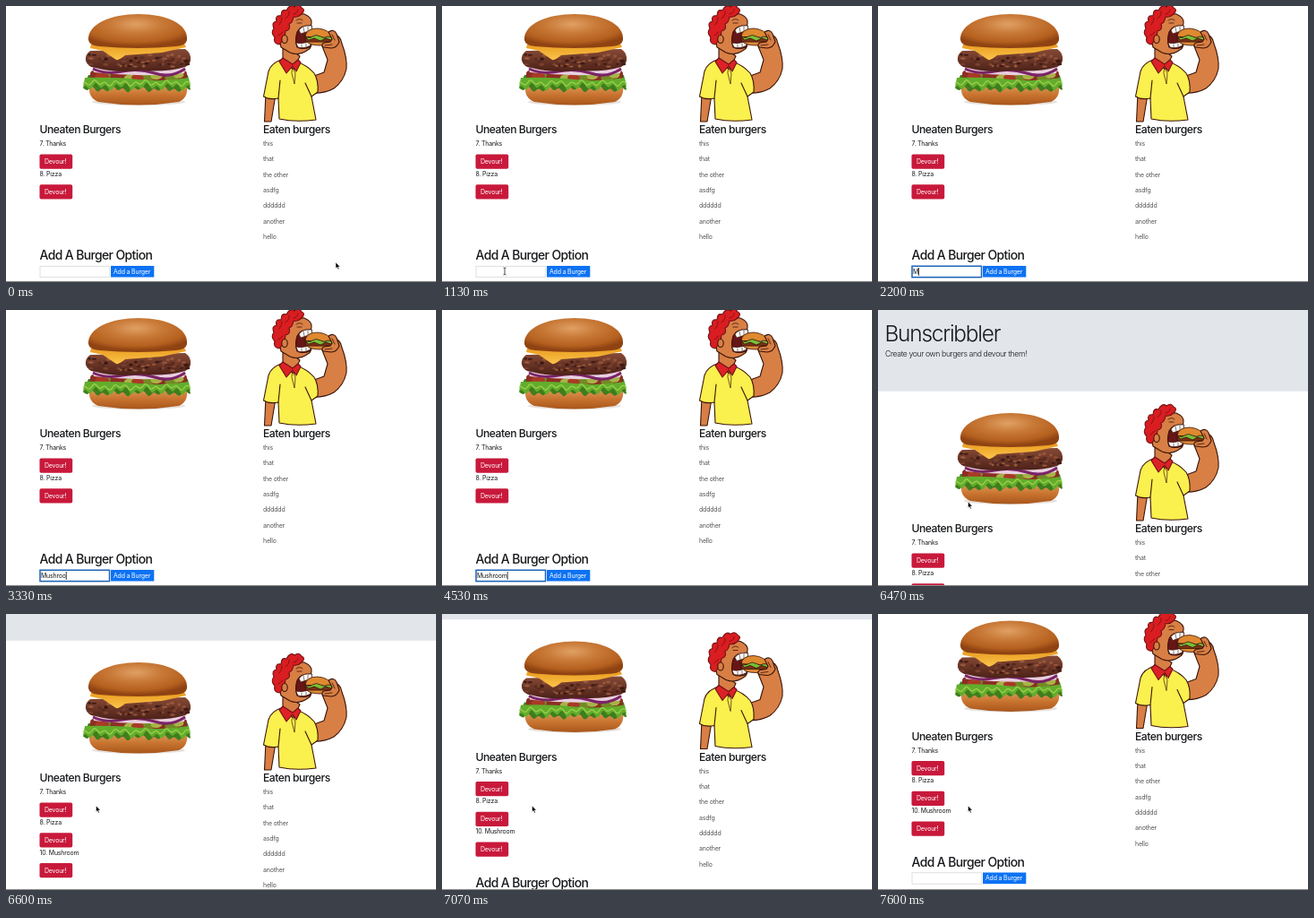
An HTML page for the animation above (8000 ms loop, 480 px wide and 308 px high).

```html
<!DOCTYPE html>
<html lang="en">
<head>
<meta charset="utf-8">
<title>Burger list</title>
<style>
  html, body { margin: 0; width: 100%; height: 100%; overflow: hidden; background: #fff; }
  svg { display: block; width: 480px; height: 308px; }
  text { font: 400 6.96px Inter, "Open Sans", sans-serif; letter-spacing: -.025em; fill: #16181b; white-space: pre; }
  .title { font-size: 24.4px; font-weight: 300; letter-spacing: -.05em; }
  .lead { font-size: 8.7px; font-weight: 300; letter-spacing: -.045em; }
  .h3 { font-size: 12.2px; font-weight: 500; letter-spacing: -.042em; }
  .h2 { font-size: 13.9px; font-weight: 500; letter-spacing: -.042em; }
  .eaten { fill: #555; }
  .label { fill: #fff; }
  .ink { stroke: #3a1408; stroke-width: 1.1; stroke-linejoin: round; stroke-linecap: round; }
  .skin { fill: #d87f45; }
  .line { fill: none; }
</style>
</head>
<body>
<svg viewBox="0 0 480 308">
  <defs>
    <radialGradient id="crown" cx=".48" cy=".3" r=".65">
      <stop offset="0" stop-color="#e0a064"/><stop offset=".4" stop-color="#c97a38"/>
      <stop offset=".8" stop-color="#b5601f"/><stop offset="1" stop-color="#8f4312"/>
    </radialGradient>
    <linearGradient id="heel" x2="0" y2="1">
      <stop offset="0" stop-color="#dc9a58"/><stop offset=".5" stop-color="#c8732f"/><stop offset="1" stop-color="#a8561c"/>
    </linearGradient>
    <linearGradient id="meat" x2="0" y2="1">
      <stop offset="0" stop-color="#874a35"/><stop offset="1" stop-color="#4c2118"/>
    </linearGradient>
    <linearGradient id="cheddar" x2="0" y2="1">
      <stop offset="0" stop-color="#e89a20"/><stop offset="1" stop-color="#fcc449"/>
    </linearGradient>
  </defs>

  <g id="page">
    <rect width="480" height="102.7" fill="#e2e6eb"/>
    <text class="title" x="7.5" y="46.5">Bunscribbler</text>
    <text class="lead" x="8" y="64.4">Create your own burgers and devour them!</text>

    <g transform="translate(0 118)">
      <g id="burger">
        <ellipse cx="148" cy="107" rx="52" ry="4" fill="#e6e1dd"/>
        <path fill="url(#heel)" d="M93 88H202Q204 102 193 107Q148 114 103 107Q91 102 93 88Z"/>
        <path id="leafBack" fill="#3f7d1d"/>
        <rect x="94" y="72" width="108" height="11" rx="4" fill="#8c2f22"/>
        <g id="pickles"></g>
        <path id="leaf" fill="#63ad2c"/>
        <path id="leafEdge" class="line" stroke="#9bd04c" stroke-width="1.3"/>
        <path fill="#e9cfe0" d="M96 66H201L199 75Q148 80 98 74Z"/>
        <path class="line" stroke="#7b2468" stroke-width="3" d="M97 70Q112 77 130 73T166 75T200 70"/>
        <path fill="url(#meat)" d="M94 50Q88 54 89 61Q91 68 100 69Q122 75 150 72Q180 74 200 68Q207 65 206 57Q205 51 200 48Z"/>
        <g id="crumbs"></g>
        <path fill="url(#cheddar)" d="M95 43L94 47L108 50L123 60Q126 61 133 55L174 52L201 46L199 42Z"/>
        <path fill="url(#crown)" d="M92 38C91 20 117 9 148 9S204 20 202 38Q201 44 190 45Q148 49 104 45Q93 44 92 38Z"/>
      </g>

      <g id="eater" class="ink">
        <path class="skin" d="M290 98L288.500 129H296L301 99Z"/>
        <path class="skin" d="M344 78L355 74L359 60L353 45Q356 36 364 32Q373 31 375 42Q381 58 380 70Q377 84 366 92Q355 98 341 97Z"/>
        <path fill="#faf04e" d="M310 59Q296 63 293 73L287.500 101Q294 105 304 103L305 126Q323 130 346 127L341 101L348 96Q349 83 344 75Q336 66 326 63Z"/>
        <path class="line" d="M304 103L306 83M341 101L334 86"/>
        <path class="skin" d="M309 42L309 62L321 71L328 56Z"/>
        <path class="skin" d="M307 46Q302 27 313 15Q322 7 333 9Q342 13 341 19Q341 23 336 24L340 42Q341 47 337 49Q327 56 317 52Z"/>
        <path fill="#671618" d="M341 22Q329 21 325 29Q322 39 325 46Q331 49 339 46Q342 44 340 40Z"/>
        <path fill="#fff" stroke-width=".7" d="M341 22Q331 21 327 27L329 31L341 27ZM324 41Q331 43 339 39L340 44Q333 48 326 46Z"/>
        <path class="line" stroke-width=".6" d="M332 24L333 29M337 23V28M330 43V46M335 42V45"/>
        <path fill="#d91d20" stroke="#711014" d="M305 43Q298 42 300 35Q295 30 299 25Q296 18 302 17Q300 10 307 11Q307 3 313 5Q317 -3 322 1Q327 -3 330 2Q335 4 330 9Q326 13 321 12Q320 19 316 20Q318 27 312 28L311 36Z"/>
        <path class="line" stroke="#711014" stroke-width=".8" d="M305 21Q309 16 308 13M312 14Q317 10 316 6M304 33L309 29M321 9Q326 8 326 4"/>
        <ellipse class="skin" cx="311" cy="37" rx="3.200" ry="4.500"/>
        <path class="line" stroke-width=".8" d="M324 16Q328 13 331 16M325 19L330 19"/>
        <path fill="#dc2227" stroke="#711014" d="M309 58L305 62L313 75L320 67L324 73L329 63L326 60L320 65Z"/>
        <path fill="#faf04e" d="M320 69L323 75L322 87L319 75Z" stroke-width=".7"/>
        <g stroke-width=".8">
          <path fill="#df8930" d="M334 34Q335 25 348 25Q361 26 364 35Z"/>
          <path fill="#dd8937" d="M335 39H364Q362 44 350 44Q338 44 335 39Z"/>
          <path fill="#7a3218" d="M334 36H365V40H335Z"/>
          <path fill="#79bf37" d="M333 33Q338 37 342 34T351 34T359 34L366 35L363 38L357 36L351 39L344 36L338 38Z"/>
        </g>
        <path class="skin" d="M360 29Q366 25 369 31L372 40Q369 47 363 47L354 46Q351 43 355 41L362 40L364 37Z"/>
        <path class="line" stroke-width=".8" d="M364 32L367 38M356 44L364 43"/>
      </g>
    </g>

    <text class="h3" x="37.500" y="260.300">Uneaten Burgers</text>
    <text class="h3" x="287" y="260.300">Eaten burgers</text>
    <g id="lists"></g>

    <text class="h2" x="37.500" y="401">Add A Burger Option</text>
    <rect id="field" x="38" y="408.300" width="77.500" height="12.400" fill="#fff"/>
    <text id="typed" x="39" y="416.900"></text>
    <rect id="caret" y="410" width=".8" height="9" fill="#111"/>
    <rect x="117" y="408" width="48.300" height="12.600" fill="#0d72f3"/>
    <text class="label" x="120" y="416.900">Add a Burger</text>
  </g>

  <rect y="307" width="480" height="1" fill="#8b8b8b"/>
  <path id="arrow" d="M0 0V6.800L1.600 5.400L2.700 7.900L3.800 7.400L2.800 5H4.900Z" stroke="#fff" stroke-width=".5"/>
  <path id="beam" d="M-1.500 -4Q0 -4 0 -3V3Q0 4 -1.500 4M1.500 -4Q0 -4 0 -3M0 3Q0 4 1.500 4" fill="none" stroke="#222" stroke-width=".8"/>
</svg>

<script>
const $ = id => document.getElementById(id);
const show = (el, on) => el.style.display = on ? '' : 'none';
const place = (el, x, y) => el.setAttribute('transform', `translate(${x} ${y})`);

// Burger texture
let seed = 11;
const rand = (lo, hi) => {
  seed = seed * 16807 % 2147483647;
  return lo + (hi - lo) * seed / 2147483647;
};
const blobs = (count, x0, x1, y0, y1, size, colors) => Array.from({ length: count }, (_, i) =>
  `<ellipse cx="${rand(x0, x1)}" cy="${rand(y0, y1)}" rx="${rand(.6, 1) * size}" ry="${rand(.3, .6) * size}" fill="${colors[i % colors.length]}"/>`
).join('');
$('crumbs').innerHTML = blobs(70, 93, 203, 54, 68, 3, ['#5a2a1e', '#96573d', '#3f1a14', '#7b4230']);
$('pickles').innerHTML = blobs(12, 98, 198, 76, 81, 9, ['#738a25', '#a8b347', '#a93a25']);

const frill = (base, amp, phase) => {
  let d = '';
  for (let x = 86; x <= 207; x += 1.5) {
    const y = base + amp * Math.sin(x * .55 + phase) + amp * .7 * Math.sin(x * .23 + phase);
    d += `${d ? 'L' : 'M'}${x} ${y.toFixed(1)}`;
  }
  return d;
};
$('leafBack').setAttribute('d', frill(93, 2, 2) + 'L203 77L92 77Z');
$('leaf').setAttribute('d', frill(90, 2.6, 0) + 'L204 80Q175 85 148 82T88 80Z');
$('leafEdge').setAttribute('d', frill(86, 2, .6));

// Lists
const uneaten = ['7. Thanks', '8. Pizza', '10. Mushroom'];
const eaten = ['this', 'that', 'the other', 'asdfg', 'dddddd', 'another', 'hello'];
$('lists').innerHTML = uneaten.map((name, i) => `
  <g transform="translate(0 ${i * 33.75})"${i === 2 ? ' id="added"' : ''}>
    <text x="37.500" y="274">${name}</text>
    <rect x="37.500" y="283.400" width="36.700" height="16.400" rx="1.800" fill="#c8193b"/>
    <text class="label" x="43" y="294.100">Devour!</text>
  </g>`).join('') + eaten.map((name, i) =>
  `<text class="eaten" x="287" y="${274 + i * 17.35}">${name}</text>`).join('');

// Timeline, in ticks of 1/15 s
const LOOP = 8000, FOCUS = 20, HIDE = 32, RELOAD = 80, MOVE = 86;
const keyTicks = [32, 37, 42, 46, 47, 49, 50, 52];
const pointer = [[0, 368, 286], [1, 290, 289], [2, 192, 293], [4, 192, 293], [13, 70, 296],
  [17, 70, 296], [22, 74, 296], [86, 74, 296], [88, 88, 262], [91, 100.5, 214]];
const scroll = [[0, 118], [79, 118], [80, 0], [96, 0], [97, 12], [98, 42], [99, 73], [100, 82],
  [101, 87], [103, 92], [105, 94.5], [106, 96.5], [107, 108], [108, 116], [109, 119.5]];

function track(points, tick, axis = 1) {
  const next = points.findIndex(p => p[0] > tick);
  if (next < 0) return points[points.length - 1][axis];
  const a = points[next - 1], b = points[next];
  return a[axis] + (b[axis] - a[axis]) * (tick - a[0]) / (b[0] - a[0]);
}

function draw(ms) {
  const tick = Math.floor((ms % LOOP + 5) * .015) % 120;
  place($('page'), 0, -track(scroll, tick));
  show($('added'), tick >= RELOAD);

  const focused = tick >= FOCUS && tick < RELOAD;
  $('field').setAttribute('stroke', focused ? '#1c61b5' : '#d2d2d2');
  $('field').setAttribute('stroke-width', focused ? 1.5 : .7);
  const count = tick < RELOAD ? keyTicks.filter(k => k <= tick).length : 0;
  $('typed').textContent = 'Mushroom'.slice(0, count);
  const blink = tick >= 28 && tick < 32 || tick >= 60 && tick < 68;
  show($('caret'), focused && !blink);
  $('caret').setAttribute('x', 39 + (count ? $('typed').getComputedTextLength() : 0));

  const visible = tick < HIDE || tick >= MOVE;
  const overField = tick > 9 && tick < HIDE;
  const x = track(pointer, tick), y = track(pointer, tick, 2);
  place($('arrow'), x, y);
  place($('beam'), x, y);
  show($('arrow'), visible && !overField);
  show($('beam'), visible && overField);
}

const start = performance.now();
function frame() {
  draw(performance.now() - start);
  requestAnimationFrame(frame);
}
frame();
</script>
</body>
</html>
```
